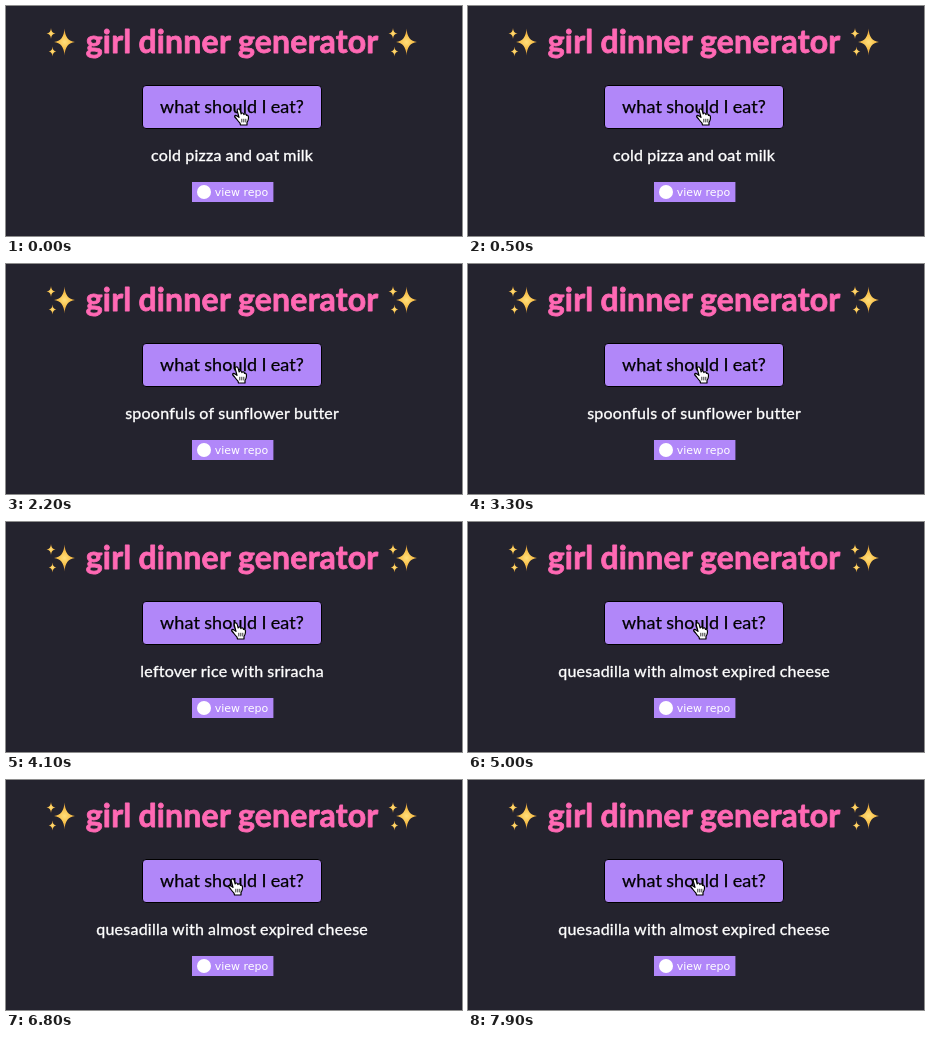
An HTML page with a canvas for the animation above (8000 ms loop, 456 by 230 pixels).

```html
<!DOCTYPE html>
<html lang="en">
<head>
<meta charset="utf-8">
<title>girl dinner generator</title>
<style>
  html, body { margin: 0; width: 100%; height: 100%; overflow: hidden; background: #24232e; }
  canvas { display: block; }
</style>
</head>
<body>
<canvas id="stage" width="456" height="230"></canvas>
<script>
const ctx = document.getElementById('stage').getContext('2d');
const LOOP = 8000;
const PURPLE = '#b187f9';

// Each meal stays until the next start time, in ms.
const meals = [
  [0, 'cold pizza and oat milk'],
  [2000, 'spoonfuls of sunflower butter'],
  [3400, 'leftover rice with sriracha'],
  [4800, 'quesadilla with almost expired cheese'],
  [5700, 'leftover rice with sriracha'],
  [6800, 'quesadilla with almost expired cheese']
];

// Pointer drift: time, x, y.
const drift = [
  [0, 228, 102], [1900, 228, 102], [2100, 226, 102], [3700, 226, 102],
  [4000, 225, 100], [5600, 225, 100], [5900, 222, 98], [8000, 222, 98]
];

const hand = new Path2D(
  'M5 9.4 L3.2 2.6 Q3 .8 4.6 .8 Q5.8 .8 6.2 2.4 L7.2 6 Q7.2 4.9 8.6 5 ' +
  'Q9.6 5.2 9.9 6.6 Q10.2 5.5 11.4 5.8 Q12.4 6.2 12.5 7.4 Q13.2 6.8 14 7.6 ' +
  'Q14.8 8.6 14.4 11 Q14 13 13 14.5 L13 17 L6.5 17 L6 15.2 Q4 13 2.6 11 ' +
  'L.8 9 Q.2 7.6 1.6 7.4 Q2.6 7.4 5 9.4 Z');
const knuckles = new Path2D('M7.8 10.8 V14.4 M9.8 10.8 V14.4 M11.8 10.8 V14.4');

// A thin outline in the fill colour gives in-between font weights.
function label(text, x, y, { font, color, spacing = 0, wordGap = 0, outline = 0 }) {
  ctx.font = font;
  ctx.fillStyle = ctx.strokeStyle = color;
  ctx.textAlign = 'center';
  ctx.letterSpacing = spacing + 'px';
  ctx.wordSpacing = wordGap + 'px';
  ctx.fillText(text, x + spacing / 2, y);
  if (outline) {
    ctx.lineWidth = outline;
    ctx.lineJoin = 'round';
    ctx.strokeText(text, x + spacing / 2, y);
  }
}

function star(x, y, rx, ry) {
  const glow = ctx.createRadialGradient(x, y, 0, x, y, ry);
  glow.addColorStop(0, '#ffdf7c');
  glow.addColorStop(0.5, '#f8c04a');
  glow.addColorStop(1, '#d8933a');
  const pinch = 0.07;
  ctx.beginPath();
  ctx.moveTo(x, y - ry);
  for (const [sx, sy, toSide] of [[1, -1, 1], [1, 1, 0], [-1, 1, 1], [-1, -1, 0]]) {
    ctx.quadraticCurveTo(x + sx * rx * pinch, y + sy * ry * pinch,
      toSide ? x + sx * rx : x, toSide ? y : y + sy * ry);
  }
  ctx.fillStyle = glow;
  ctx.fill();
}

function sparkles(x) {
  star(x + 19, 36, 10.5, 13.5);
  star(x + 5.5, 27.5, 4.5, 5.5);
  star(x + 7, 45.5, 3.8, 5);
}

function pointerAt(t) {
  const i = drift.findIndex(p => p[0] > t);
  const [t0, x0, y0] = drift[i - 1], [t1, x1, y1] = drift[i];
  const k = (t - t0) / (t1 - t0);
  return [Math.round(x0 + (x1 - x0) * k), Math.round(y0 + (y1 - y0) * k)];
}

function drawPointer(t) {
  ctx.save();
  ctx.translate(...pointerAt(t));
  ctx.lineJoin = 'round';
  ctx.strokeStyle = '#000';
  ctx.fillStyle = '#fff';
  ctx.lineWidth = 1.2;
  ctx.fill(hand);
  ctx.stroke(hand);
  ctx.lineWidth = 0.8;
  ctx.stroke(knuckles);
  ctx.restore();
}

function drawTitle() {
  sparkles(39.5);
  sparkles(381.5);
  label('girl dinner generator', 226, 47, {
    font: 'bold 32px Lato, sans-serif', color: '#ff69b4',
    spacing: 0.2, wordGap: -1, outline: 0.8
  });
}

function drawButton() {
  ctx.beginPath();
  ctx.roundRect(136.5, 79.5, 179, 43, 3.5);
  ctx.fillStyle = PURPLE;
  ctx.fill();
  ctx.strokeStyle = '#000';
  ctx.lineWidth = 1;
  ctx.stroke();
  label('what should I eat?', 226, 107, {
    font: '18px Lato, sans-serif', color: '#000',
    spacing: 0.1, wordGap: -0.5, outline: 0.25
  });
}

function drawMeal(t) {
  const meal = meals.findLast(m => m[0] <= t)[1];
  label(meal, 226, 155, {
    font: '16px Lato, sans-serif', color: '#fff',
    spacing: 0.24, wordGap: -0.4, outline: 0.35
  });
}

function drawBadge() {
  ctx.fillStyle = PURPLE;
  ctx.fillRect(186, 176, 81.4, 20);
  ctx.beginPath();
  ctx.arc(198, 186, 7, 0, Math.PI * 2);
  ctx.fillStyle = '#fff';
  ctx.fill();
  label('view repo', 235.5, 190, { font: '11px "DejaVu Sans", sans-serif', color: '#fff' });
}

function draw(t) {
  ctx.fillStyle = '#24232e';
  ctx.fillRect(0, 0, 456, 230);
  drawTitle();
  drawButton();
  drawMeal(t);
  drawBadge();
  drawPointer(t);
}

function tick() {
  const t = performance.now() % LOOP;
  draw(Math.floor(t / 100) * 100);
  requestAnimationFrame(tick);
}
tick();
</script>
</body>
</html>
```
